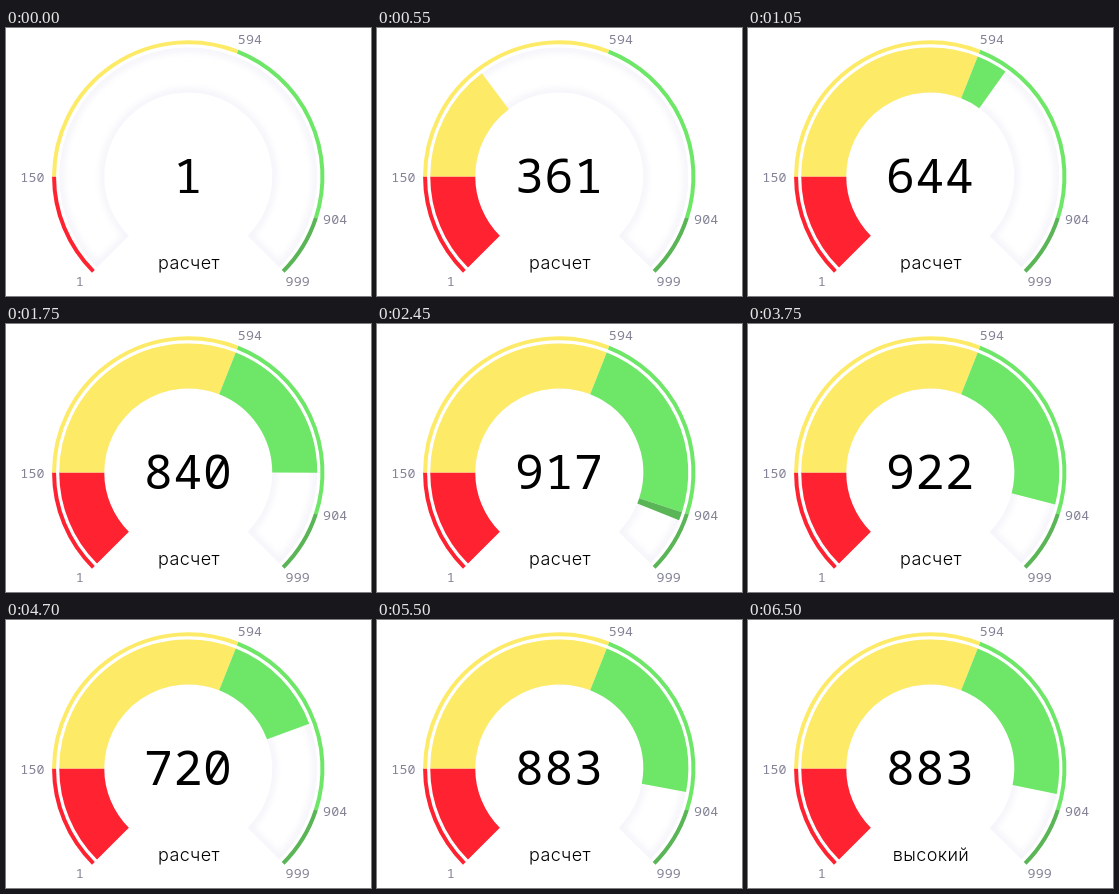
Recreate the animation shown at these times as an HTML page. Size 365x268 px, loop 7.6 s.

```html
<!DOCTYPE html>
<html lang="ru">
<head>
<meta charset="utf-8">
<title>Gauge</title>
<style>
  html, body { margin: 0; width: 100%; height: 100%; overflow: hidden; background: #fff; }
  svg { display: block; width: 365px; height: 268px; }
  path { fill: none; }
  .tick { font: 300 13.3px "Noto Sans Mono", monospace; letter-spacing: .15px; fill: #828296; }
  .num { font: 48px "Noto Sans Mono", monospace; letter-spacing: .8px; fill: #000; text-anchor: middle; }
  .label { font: 300 18px Inter, sans-serif; letter-spacing: .4px; fill: #000; text-anchor: middle; }
</style>
</head>
<body>
<svg viewBox="0 0 365 268">
  <defs>
    <clipPath id="inside"><path id="clip"/></clipPath>
    <filter id="soft" x="-10%" y="-10%" width="120%" height="120%"><feGaussianBlur stdDeviation="3.5"/></filter>
  </defs>
  <g clip-path="url(#inside)">
    <path id="track" stroke="#f3f3fa" stroke-width="8" filter="url(#soft)"/>
  </g>
  <g id="ring" stroke-width="4"></g>
  <g id="fill" stroke-width="45"></g>
  <g class="tick">
    <text x="69.7" y="258">1</text>
    <text x="14.3" y="154">150</text>
    <text x="231.8" y="16">594</text>
    <text x="317" y="195.5">904</text>
    <text x="279.5" y="258">999</text>
  </g>
  <text class="num" id="num" x="182.3" y="165.3">1</text>
  <text class="label" id="before" x="183" y="241">расчет</text>
  <text class="label" id="after" x="183" y="241" opacity="0">высокий</text>
</svg>
<script>
const LOOP = 7600, STEP = 50, LAST = 6500;
const CX = 182.25, CY = 148.4, INNER = 84, OUTER = 129, RING = 134.2;
const STOPS = [0, 45, 156.6, 243, 270];
const VALUES = [1, 150, 594, 904, 999];
const COLORS = ['#ff2231', '#fdeb68', '#6ee667', '#5ab556'];

const $ = id => document.getElementById(id);
const phase = (t, start, length) => Math.max(0, Math.min(1, (t - start) / length));
const inOut = (p, k) => p < .5 ? (2 * p) ** k / 2 : 1 - (2 - 2 * p) ** k / 2;

// Rise towards the peak, drop back, then settle
const rise = t => 257.5 * (1 - Math.exp(-((t / 983) ** 1.265)));
const sweepAt = t => rise(t)
  - 53 * inOut(phase(t, 3250, 1250), 2)
  + 31.9 * inOut(phase(t, 4520, 1200), 3);
const countAt = t => toValue(rise(t))
  - 234 * inOut(phase(t, 3320, 1360), 3)
  + 162 * inOut(phase(t, 4700, 780), 3);

function toValue(deg) {
  let i = 0;
  while (deg > STOPS[i + 1]) i++;
  const part = (deg - STOPS[i]) / (STOPS[i + 1] - STOPS[i]);
  return VALUES[i] + part * (VALUES[i + 1] - VALUES[i]);
}

function point(r, deg) {
  const a = (135 + deg) * Math.PI / 180;
  return (CX + r * Math.cos(a)).toFixed(3) + ' ' + (CY + r * Math.sin(a)).toFixed(3);
}

function arc(r, from, to, start = 'M') {
  const large = Math.abs(to - from) > 180 ? 1 : 0, dir = to > from ? 1 : 0;
  return `${start}${point(r, from)}A${r} ${r} 0 ${large} ${dir} ${point(r, to)}`;
}

function segments(id) {
  return COLORS.map(color => {
    const p = document.createElementNS('http://www.w3.org/2000/svg', 'path');
    p.setAttribute('stroke', color);
    $(id).appendChild(p);
    return p;
  });
}

const sector = arc(OUTER, 0, 270) + arc(INNER, 270, 0, 'L') + 'Z';
$('clip').setAttribute('d', sector);
$('track').setAttribute('d', sector);
segments('ring').forEach((p, i) => p.setAttribute('d', arc(RING, STOPS[i], STOPS[i + 1])));
const bands = segments('fill');

function draw(now) {
  const t = Math.min(LAST, Math.floor(now % LOOP / STEP) * STEP);
  const sweep = sweepAt(t);
  bands.forEach((p, i) => {
    const end = Math.min(STOPS[i + 1], sweep);
    p.setAttribute('d', end > STOPS[i] ? arc((INNER + OUTER) / 2, STOPS[i], end) : '');
  });
  $('num').textContent = Math.round(countAt(t));
  $('before').setAttribute('opacity', 1 - phase(t, 5600, 450));
  $('after').setAttribute('opacity', phase(t, 6050, 450));
}

function tick() {
  draw(performance.now());
  requestAnimationFrame(tick);
}
tick();
</script>
</body>
</html>
```
